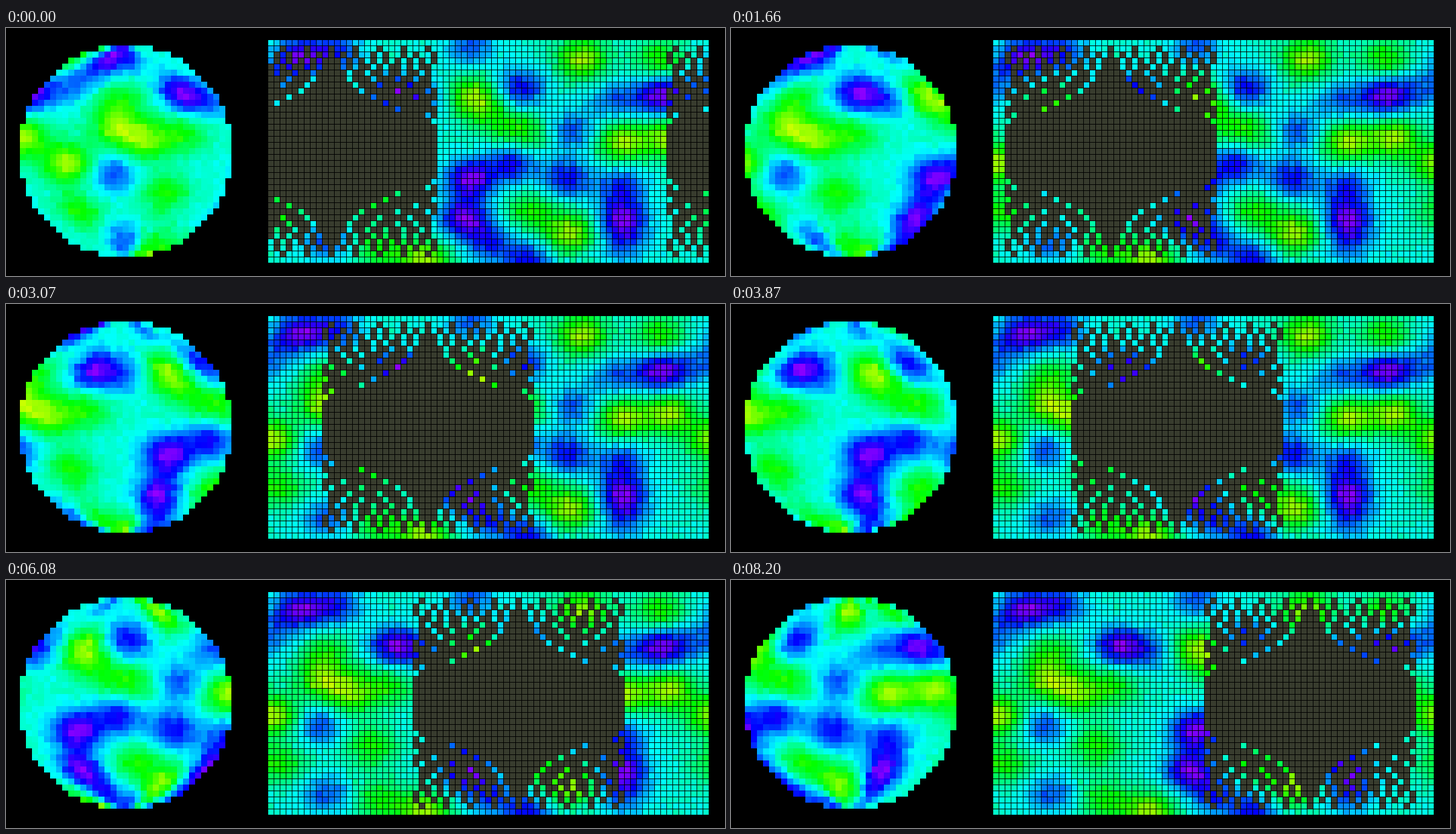
Write a matplotlib script that moves like this. It is 1190 px wide and 411 px high and loops after 8.34 s.

```python
import numpy as np
import matplotlib.pyplot as plt
from matplotlib.animation import FuncAnimation
from matplotlib.colors import hsv_to_rgb

WIDTH, HEIGHT, DPI = 1190, 411, 64
LOOP_MS, TICK_MS = 8340, 20
CELL = 10
COLS, ROWS = 73, 37
DISK = 35                      # globe diameter in cells
MAP_X, MAP_Y = 433, 19
DISK_X, DISK_Y = 23, 29
FIRST_COL, STEPS = 10, 42
SEEN = (56, 60, 46)            # map cells currently on the globe

# Terrain: hue in degrees, with a few (column, row) key points per level.
BASE = 170
VIOLET, BLUE, AZURE, GREEN, YELLOW = 275, 242, 222, 115, 80
KEY_POINTS = {
    VIOLET: [(5, 2.3), (20.5, 8.5), (33, 22.5), (32, 29), (64.5, 8.7),
             (58.3, 29.5)],
    BLUE: [(11, 1.8), (41.5, 7.5), (40, 20), (49, 22.5), (58, 24),
           (36, 33), (42.5, 36)],
    AZURE: [(1, 5.5), (8, 21.7), (26, 9.3), (33, 0.5), (50, 14.5),
            (57, 9.5), (70.5, 8), (58.3, 34), (9, 33)],
    GREEN: [(9, 9.5), (19.5, 15), (16.5, 25), (1.5, 28), (18, 34),
            (37, 12.5), (42, 15), (43, 28), (64.5, 3)],
    YELLOW: [(8.5, 14), (13, 16.3), (0.5, 20), (33.4, 9), (51.5, 2.7),
             (58.2, 16.3), (66, 15.8), (25.3, 36), (49.5, 31.5)],
}


def kernel(a, b):
    """Gaussian closeness of two point sets, wrapping around in x."""
    dx = a[:, None, 0] - b[None, :, 0]
    dx = (dx + COLS / 2) % COLS - COLS / 2
    dy = a[:, None, 1] - b[None, :, 1]
    return np.exp(-0.5 * ((dx / 2.9) ** 2 + (dy / 2.3) ** 2))


def make_terrain():
    """Smooth hue field through the key points, with slight cell noise."""
    points = np.array([p for group in KEY_POINTS.values() for p in group])
    sizes = [len(group) for group in KEY_POINTS.values()]
    hues = np.repeat(list(KEY_POINTS), sizes)
    gram = kernel(points, points) + 0.03 * np.eye(len(points))
    weights = np.linalg.solve(gram, hues - BASE)

    rows, cols = np.mgrid[:ROWS, :COLS]
    cells = np.column_stack([cols.ravel(), rows.ravel()])
    hue = BASE + (kernel(cells, points) @ weights).reshape(ROWS, COLS)
    hue += np.random.default_rng(4).normal(0, 4, hue.shape)
    hue = np.clip(hue, 62, 292) / 360
    ones = np.ones_like(hue)
    rgb = hsv_to_rgb(np.dstack([hue, ones, ones]))
    return np.round(rgb * 255).astype(np.uint8)


def globe_cells():
    """Globe cell positions and the map offset each one looks up."""
    radius = DISK / 2
    dy, dx = np.mgrid[:DISK, :DISK] - DISK // 2
    half = np.sqrt(radius ** 2 - dy ** 2)
    inside = np.abs(dx) <= half
    shift = np.trunc(dx * radius / half).astype(int)
    row, col = np.nonzero(inside)
    return row, col, shift[inside]


def enlarge(cells):
    return cells.repeat(CELL, axis=0).repeat(CELL, axis=1)


def paste(stage, block, x, y):
    h, w = block.shape[:2]
    stage[y:y + h, x:x + w] = block


terrain = make_terrain()
disk_row, disk_col, disk_shift = globe_cells()


def render(step):
    map_row = disk_row + 1
    map_col = (FIRST_COL + step + disk_shift) % COLS

    globe = np.zeros((DISK, DISK, 3), np.uint8)
    globe[disk_row, disk_col] = terrain[map_row, map_col]

    flat = terrain.copy()
    flat[map_row, map_col] = SEEN
    flat = enlarge(flat)
    flat[::CELL] = 0
    flat[:, ::CELL] = 0

    stage = np.zeros((HEIGHT, WIDTH, 3), np.uint8)
    paste(stage, enlarge(globe), DISK_X, DISK_Y)
    paste(stage, flat, MAP_X, MAP_Y)
    return stage


def step_at(ms):
    """One column every 200 ms; the last step comes a little early."""
    if ms >= 8200:
        return STEPS
    return max(0, int((ms - 70) // 200) + 1)


views = [render(step) for step in range(STEPS + 1)]

fig = plt.figure(figsize=(WIDTH / DPI, HEIGHT / DPI), dpi=DPI,
                 facecolor="black")
picture = fig.figimage(views[0], origin="upper")


def update(frame):
    picture.set_data(views[step_at(frame * TICK_MS + TICK_MS / 2)])
    return [picture]


anim = FuncAnimation(fig, update, frames=LOOP_MS // TICK_MS,
                     interval=TICK_MS, repeat=True, repeat_delay=0)
plt.show()
```
